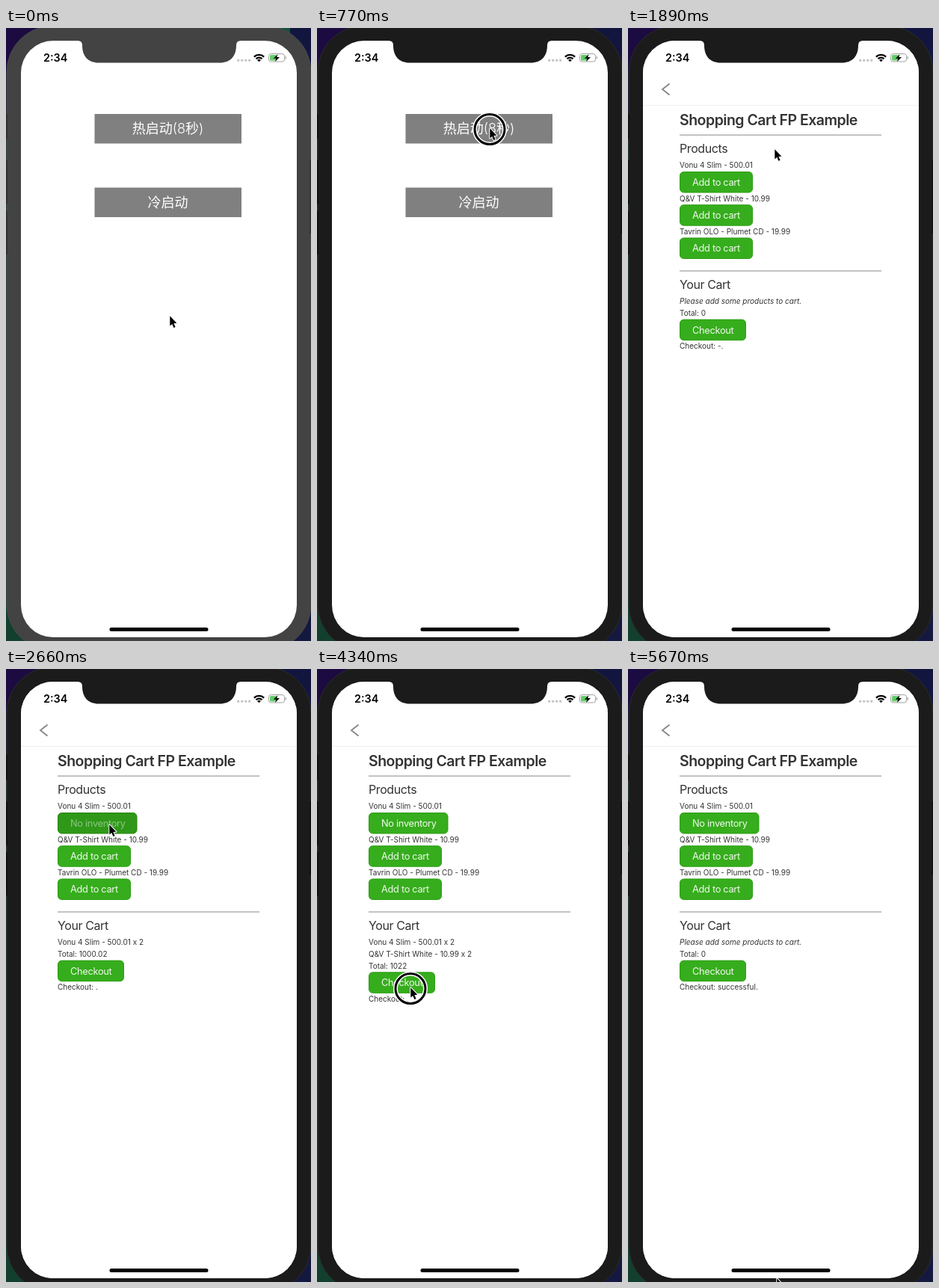
Animation, 408 px wide and 820 px high, one loop 5740 ms. Source, as an HTML page with a canvas:

```html
<!DOCTYPE html>
<html lang="zh-Hans">
<head>
<meta charset="utf-8">
<title>Shopping cart demo</title>
<style>
html, body { margin: 0; width: 100%; height: 100%; overflow: hidden; background: #1b1b1b; }
canvas { display: block; width: 408px; height: 820px; }
</style>
</head>
<body>
<canvas id="stage" width="408" height="820"></canvas>
<script>
const ctx = document.getElementById('stage').getContext('2d');
const LOOP = 5740, STEP = 70;
const SANS = 'Inter, "Noto Sans CJK SC", "Noto Sans CJK", sans-serif';
const INK = '#333';

// pointer moves: start, end, x, y
const START = [219, 385];
const MOVES = [
  [0, 560, 231, 134],
  [1680, 2184, 138, 208],
  [2800, 3010, 128, 250],
  [3430, 3780, 126, 441],
  [3920, 4060, 125, 426],
  [4760, 5670, 199, 815]
];
const CLICKS = [[700, 840], [2240, 2310], [2520, 2590], [3080, 3150], [3290, 3360], [4270, 4410]];
const PRESSES = {
  first: [[2310, 2450], [2590, 2800]],
  second: [[3150, 3290], [3360, 3500]],
  checkout: [[4410, 4550]]
};
const ITEMS = [
  { name: 'Vonu 4 Slim', price: '500.01', key: 'first' },
  { name: 'Q&V T-Shirt White', price: '10.99', key: 'second' },
  { name: 'Tavrin OLO - Plumet CD', price: '19.99', key: 'third' }
];
// cart states: time, quantities, total, status
const CARTS = [
  [0, [0, 0], '0', '-'],
  [2310, [1, 0], '500.01', ''],
  [2590, [2, 0], '1000.02', ''],
  [3150, [2, 1], '1011.01', ''],
  [3360, [2, 2], '1022', ''],
  [4480, [0, 0], '0', ''],
  [4620, [0, 0], '0', 'successful']
];

const clamp = v => Math.min(1, Math.max(0, v));
const smooth = p => p * p * (3 - 2 * p);
const within = (t, spans) => (spans || []).some(([a, b]) => t >= a && t < b);

function text(str, x, y, size, opt = {}) {
  ctx.font = `${opt.style || ''} ${opt.weight || 400} ${size}px ${SANS}`;
  ctx.letterSpacing = (opt.track || 0) + 'px';
  ctx.textAlign = opt.align || 'left';
  ctx.fillStyle = opt.color || INK;
  ctx.fillText(str, x, y);
}

function box(x, y, w, h, r, fill, stroke) {
  ctx.beginPath();
  ctx.roundRect(x, y, w, h, r);
  if (fill) { ctx.fillStyle = fill; ctx.fill(); }
  if (stroke) { ctx.strokeStyle = stroke; ctx.lineWidth = 1; ctx.stroke(); }
}

function rect(x, y, w, h, color) {
  ctx.fillStyle = color;
  ctx.fillRect(x, y, w, h);
}

function poly(points, closed) {
  ctx.beginPath();
  points.forEach(([x, y]) => ctx.lineTo(x, y));
  if (closed) ctx.closePath();
}

function phone(active) {
  rect(0, 0, 204, 410, '#1b0b40');
  rect(204, 0, 204, 410, '#12163f');
  rect(0, 150, 30, 670, '#123f2e');
  rect(204, 410, 204, 410, '#15183f');
  if (!active) rect(366, 0, 14, 8, '#14523a');
  const body = active ? '#1b1b1b' : '#434343';
  box(1, -3, 407, 836, 62, body, active ? '#2b2b2b' : '#4a4a4a');
  const key = active ? '#111' : '#333';
  rect(0, 115, 2, 33, key);
  rect(0, 177, 2, 59, key);
  rect(0, 245, 2, 58, key);
  rect(406, 177, 2, 98, key);
  box(20, 17, 369, 798, 43, '#fff');
  return body;
}

function notch(color) {
  ctx.beginPath();
  ctx.moveTo(96, 16);
  ctx.lineTo(96, 17);
  ctx.quadraticCurveTo(102, 17, 102, 23);
  ctx.bezierCurveTo(102, 38, 110, 46.5, 124, 46.5);
  ctx.lineTo(286, 46.5);
  ctx.bezierCurveTo(300, 46.5, 308, 38, 308, 23);
  ctx.quadraticCurveTo(308, 17, 314, 17);
  ctx.lineTo(314, 16);
  ctx.fillStyle = color;
  ctx.fill();
}

function statusBar() {
  text('2:34', 50, 45, 14.4, { weight: 600, color: '#000' });
  ctx.fillStyle = '#c6c6c6';
  for (let i = 0; i < 4; i++) {
    ctx.beginPath();
    ctx.arc(310.7 + i * 5, 43.2, 1.7, 0, 7);
    ctx.fill();
  }
  const a = Math.PI * 1.25, b = Math.PI * 1.75;
  ctx.strokeStyle = ctx.fillStyle = '#000';
  ctx.lineWidth = 2.3;
  [5.7, 9.4].forEach(r => {
    ctx.beginPath();
    ctx.arc(338.5, 45.3, r, a, b);
    ctx.stroke();
  });
  ctx.beginPath();
  ctx.moveTo(338.5, 45.3);
  ctx.arc(338.5, 45.3, 3.4, a, b);
  ctx.fill();
  box(351.5, 34.5, 21, 10.5, 3, '#fff', '#a2a2a2');
  box(353, 36, 9, 7.5, 1.5, '#62cb68');
  rect(373.6, 38, 1.2, 3.5, '#a2a2a2');
  poly([[363.5, 35], [357.8, 40.7], [361.4, 40.7], [360, 45], [366, 39], [362.3, 39]], true);
  ctx.fillStyle = '#000';
  ctx.fill();
}

function menuPage(dx) {
  [['热启动(8秒)', 115], ['冷启动', 213.5]].forEach(([label, y]) => {
    rect(118.5 + dx, y, 196.5, 39.5, '#808080');
    text(label, 216.5 + dx, y + 26.3, 18, { weight: 300, align: 'center', color: '#fff' });
  });
}

function button(label, y, w, pressed) {
  box(69.5, y + .5, w - 1, 27.5, 5, pressed ? '#2f9819' : '#36ad1c', pressed ? '#27850f' : '#2a9d13');
  text(label, 86, y + 18.9, 12.8, {
    track: -.3,
    color: pressed ? 'rgba(255,255,255,.45)' : 'rgba(255,255,255,.93)'
  });
}

function shopPage(t) {
  const [, counts, total, status] = CARTS.filter(c => c[0] <= t).pop();
  text('Shopping Cart FP Example', 69, 130.3, 19.5, { weight: 600, track: -.5 });
  rect(69, 142.5, 270, 1.3, '#a4a4a4');
  text('Products', 69, 166.5, 16, { track: -.4 });
  ITEMS.forEach((item, i) => {
    const y = 187.3 + i * 44.2;
    const empty = i === 0 && t >= 2590;
    text(`${item.name} - ${item.price}`, 69, y, 10);
    button(empty ? 'No inventory' : 'Add to cart', y + 4.7, empty ? 106.5 : 98, within(t, PRESSES[item.key]));
  });
  rect(69, 324.3, 270, 1.3, '#a4a4a4');
  text('Your Cart', 69, 348.5, 16, { track: -.4 });

  let y = 369.2;
  const line = (str, style) => { text(str, 69, y, 10, { style }); y += 15.7; };
  counts.forEach((n, i) => {
    if (n) line(`${ITEMS[i].name} - ${ITEMS[i].price} x ${n}`);
  });
  if (!counts[0]) line('Please add some products to cart.', 'italic');
  line('Total: ' + total);
  if (t >= 1610) {
    button('Checkout', y - 11, 89, within(t, PRESSES.checkout));
    text(`Checkout: ${status}.`, 69, y + 28.4, 10);
  }
}

function screen(t) {
  const push = 1 - Math.pow(1 - clamp((t - 910) / 560), 3);
  ctx.save();
  ctx.beginPath();
  ctx.roundRect(20, 17, 369, 798, 43);
  ctx.clip();
  if (push < 1) menuPage(-110 * push);
  if (push > 0) {
    ctx.save();
    ctx.translate(369 * (1 - push), 0);
    rect(20, 17, 369, 798, '#fff');
    rect(20, 103, 369, 1, '#f0f0f0');
    if (t >= 1330) shopPage(t);
    ctx.restore();
    ctx.globalAlpha = push;
    poly([[55.5, 74.5], [46, 82], [55.5, 89.5]]);
    ctx.strokeStyle = '#858585';
    ctx.lineWidth = 1.8;
    ctx.stroke();
  }
  ctx.restore();
}

function pointerAt(t) {
  let [x, y] = START;
  for (const [a, b, nx, ny] of MOVES) {
    const p = smooth(clamp((t - a) / (b - a)));
    x += (nx - x) * p;
    y += (ny - y) * p;
  }
  return [x, y];
}

function pointer(t) {
  const [x, y] = pointerAt(t);
  ctx.save();
  ctx.translate(x, y);
  if (within(t, CLICKS)) {
    [[6, '#fff'], [3, '#000']].forEach(([w, color]) => {
      ctx.beginPath();
      ctx.arc(0, 1.5, 20, 0, 7);
      ctx.lineWidth = w;
      ctx.strokeStyle = color;
      ctx.stroke();
    });
  }
  poly([[.3, .3], [.3, 13.6], [3.2, 10.9], [5.4, 16], [7.6, 15], [5.4, 10.1], [9.4, 9.8]], true);
  ctx.lineJoin = 'round';
  ctx.lineWidth = 2;
  ctx.strokeStyle = '#fff';
  ctx.stroke();
  ctx.fillStyle = '#000';
  ctx.fill();
  ctx.restore();
}

function draw(t) {
  ctx.clearRect(0, 0, 408, 820);
  const body = phone(t >= 700);
  screen(t);
  notch(body);
  statusBar();
  box(138.5, 802, 132, 5, 2.5, '#000');
  pointer(t);
}

const began = performance.now();
function tick() {
  const t = (performance.now() - began) % LOOP;
  draw(Math.floor(t / STEP) * STEP);
  requestAnimationFrame(tick);
}
tick();
</script>
</body>
</html>
```
